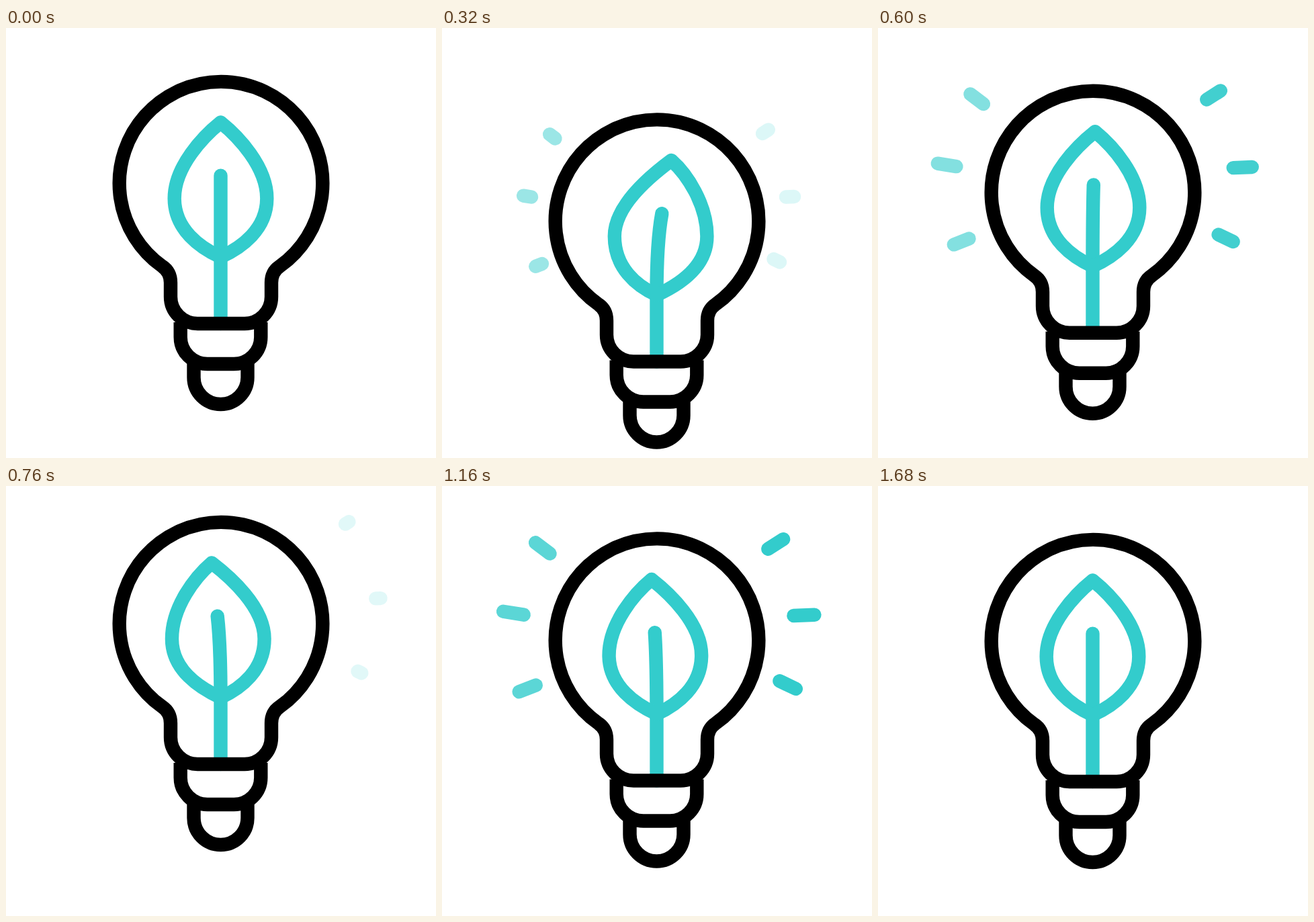
Write an HTML page that moves like this. It is 640 px wide and 640 px high and loops after 2000 ms.

```html
<!DOCTYPE html>
<html lang="en">
<head>
<meta charset="utf-8">
<title>Green idea</title>
<style>
  html, body { margin: 0; height: 100%; overflow: hidden; background: #fff; }
  svg { display: block; width: 100vw; height: 100vh; }
  path { fill: none; stroke-width: 20.4; stroke-linejoin: round; }
  .teal { stroke: #3cc; stroke-linecap: round; }
  .ink { stroke: #000; }
</style>
</head>
<body>
<svg viewBox="0 0 640 640"><g id="all"></g></svg>
<script>
const LOOP = 2000, STEP = 40, CYCLE = 600;
const X = 319.5, ROOT = 341;
const all = document.getElementById('all');

function path(cls, d = '') {
  const el = document.createElementNS('http://www.w3.org/2000/svg', 'path');
  el.setAttribute('class', cls);
  el.setAttribute('d', d);
  return all.appendChild(el);
}

const ramp = (t, a, b) => Math.min(1, Math.max(0, (t - a) / (b - a)));
const ease = (t, a, b) => {
  const x = ramp(t, a, b);
  return x * x * (3 - 2 * x);
};
const mix = (a, b, k) => a + (b - a) * k;

// Eased path through keys of [time, value]
const track = (keys, t) => keys.slice(1).reduce(
  (v, [time, value], i) => mix(v, value, ease(t, keys[i][0], time)), keys[0][1]);

const bob = [[60, 0], [342, 57.5], [906, -42.7], [1390, 34], [1665, 0]];
const sway = [[60, 0], [342, 22.2], [906, -20.5], [1340, 0]];

// Rays fan out from a focus on each side, starting at the given points
const fan = (focus, delay, starts) => starts.map(([x, y], i) => {
  const dx = x - focus[0], dy = y - focus[1];
  const k = (i === 1 ? 45.5 : 39.5) / Math.hypot(dx, dy);
  return { x, y, dx: dx * k, dy: dy * k, delay, el: path('teal') };
});
const rays = [
  ...fan([325, 226], 0, [[168.5, 108], [133, 195], [149, 294.5]]),
  ...fan([316, 203], 65, [[477, 100.5], [512, 195], [493.5, 287.5]])
];

// Rounded cup of the screw cap, half as wide as w
const cup = (w, y) => path('ink',
  `M${X - w} ${y}v22a40 40 0 0 0 40 40H${X + w - 40}a40 40 0 0 0 40-40v-22`);

const stem = path('teal');
const leaf = path('teal');
cup(59.8, 438);
cup(40, 498);
path('ink', 'M233 355A151.3 151.3 0 1 1 407 355C399 360.5 395 369 395 379V400' +
  'A40 40 0 0 1 355 440H285A40 40 0 0 1 245 400V379C245 369 241 360.5 233 355Z');

// One side of the leaf, tip to root: the tip sways fully, the flank a little
function halfLeaf(side, d) {
  const p = (dx, y, share) => `${X + side * dx + d * share} ${y} `;
  return 'M' + p(0, 140.5, 1) +
    'C' + p(25.5, 161, 0.9) + p(68.8, 206, 0.28) + p(68.8, 253.5, 0.28) +
    'C' + p(68.8, 300, 0.28) + p(30.5, 327, 0) + p(0, ROOT, 0);
}

function drawRays(t) {
  const u = t < 820 ? t : t - CYCLE;
  const head = ease(u, 160, 635), tail = ease(u, 405, 880);
  for (const { x, y, dx, dy, delay, el } of rays) {
    const v = u - delay, at = k => `${x + dx * k} ${y + dy * k}`;
    el.setAttribute('d', `M${at(tail)}L${at(head)}`);
    el.setAttribute('opacity', ramp(v, 221, 425) * (1 - ramp(v, 520, 725)));
  }
}

function draw(now) {
  const t = Math.floor(now % LOOP / STEP) * STEP;
  const d = track(sway, t);
  all.setAttribute('transform', `translate(0 ${track(bob, t)})`);
  leaf.setAttribute('d', halfLeaf(1, d) + halfLeaf(-1, d));
  stem.setAttribute('d', `M${X} 440V${ROOT}Q${X} 262 ${X + d * 0.36} 219.7`);
  drawRays(t);
}

function loop(now) {
  draw(now);
  requestAnimationFrame(loop);
}
draw(0);
requestAnimationFrame(loop);
</script>
</body>
</html>
```
